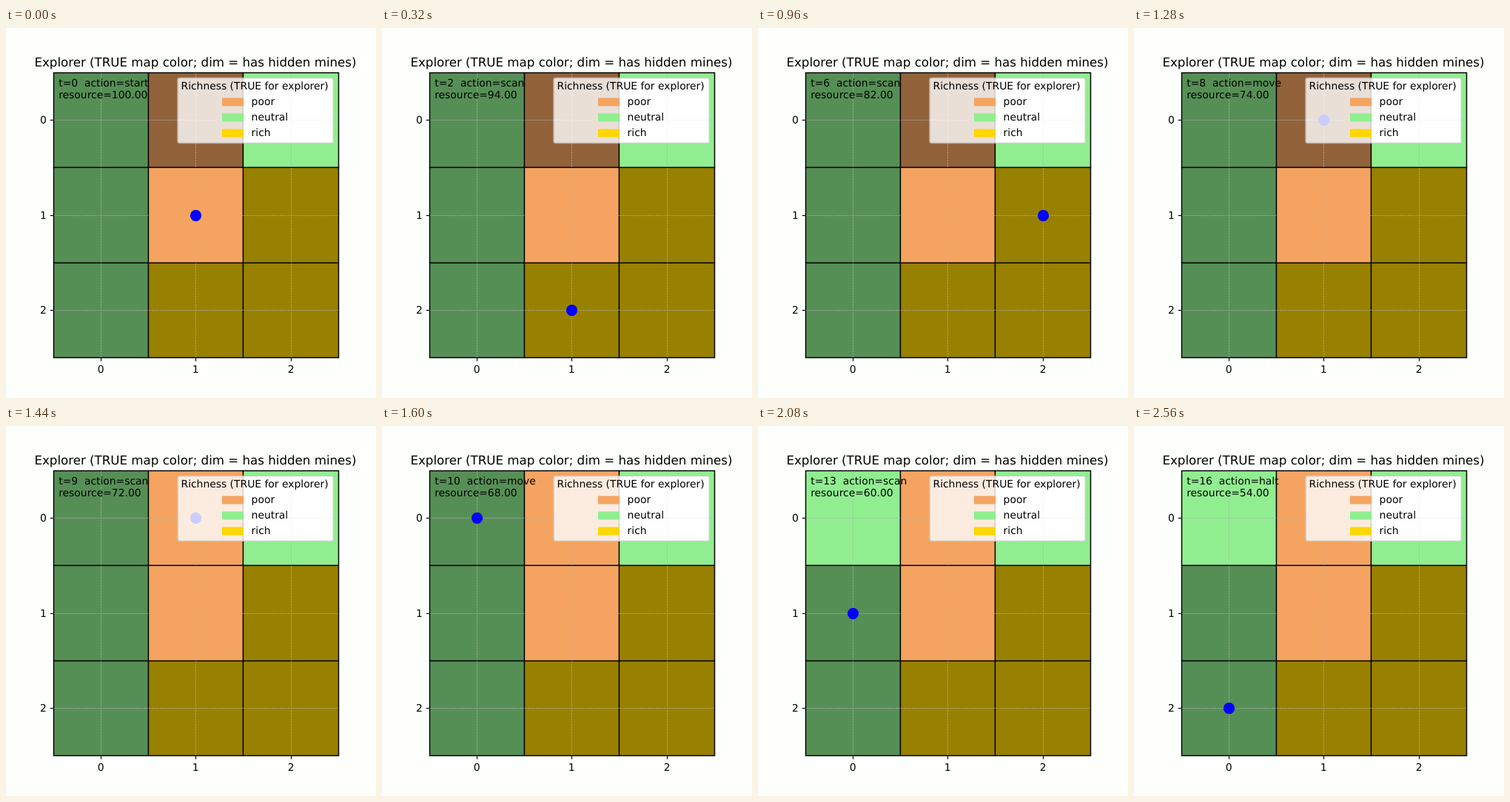
These frames come from a looping animation (500x500 px, 2720 ms). An HTML page:

```html
<!DOCTYPE html>
<html lang="en">
<head>
<meta charset="utf-8">
<title>Explorer map</title>
<style>
  html, body { margin: 0; width: 100%; height: 100%; overflow: hidden; background: #fdfffc; }
  svg { display: block; width: 500px; height: 500px; }
  text { font: 13.89px "DejaVu Sans", sans-serif; text-rendering: geometricPrecision; white-space: pre; }
  .title { font-size: 16.67px; }
  .cell { stroke: #000; stroke-width: 1.39; }
  .grid { stroke: #b0b0b0; stroke-width: .69; stroke-dasharray: 2.57 1.11; }
  .axis { fill: none; stroke: #000; stroke-width: 1.11; }
  .box { fill: #fff; stroke: #ccc; stroke-width: 1.39; opacity: .8; }
</style>
</head>
<body>
<svg viewBox="0 0 500 500">
  <text class="title" x="256" y="52" text-anchor="middle">Explorer (TRUE map color; dim = has hidden mines)</text>
  <g id="cells"></g>
  <rect x="321.2" y="68" width="121" height="87.5" fill="#fdfffc"/>
  <g id="axes"></g>
  <rect class="axis" x="64.5" y="60.5" width="385" height="385"/>
  <circle id="agent" r="7.64" fill="#00f"/>
  <text id="status" x="71.2" y="79"></text>
  <text id="resource" x="71.2" y="95"></text>
  <rect class="box" x="232" y="67.5" width="210.3" height="88" rx="2.8"/>
  <text x="236.5" y="83">Richness (TRUE for explorer)</text>
  <g id="legend"></g>
</svg>
<script>
  const STEP = 160;
  const COST = { start: 0, move: 4, scan: 2, halt: 0 };
  const RICHNESS = { poor: [244, 164, 96], neutral: [144, 238, 144], rich: [255, 215, 0] };
  const MAP = [
    ["neutral", "poor", "neutral"],
    ["neutral", "poor", "rich"],
    ["neutral", "rich", "rich"]
  ];
  const SAFE = ["1,1", "2,0"];
  const CLEARED_AT = { "1,0": 9, "0,0": 11 };

  // Cell borders and tick positions, snapped to the pixel grid
  const edgeX = [64.5, 192.5, 320.5, 449.5], edgeY = [60.5, 188.5, 317.5, 445.5];
  const tickX = [128.5, 256.5, 385.5], tickY = [124.5, 253.5, 381.5];

  // Action, column, row
  const log = [
    ["start", 1, 1], ["move", 1, 2], ["scan", 1, 2], ["move", 2, 2], ["scan", 2, 2],
    ["move", 2, 1], ["scan", 2, 1], ["move", 2, 0], ["move", 1, 0], ["scan", 1, 0],
    ["move", 0, 0], ["scan", 0, 0], ["move", 0, 1], ["scan", 0, 1], ["move", 0, 2],
    ["scan", 0, 2], ["halt", 0, 2]
  ];
  let left = 100;
  const resources = log.map(([action]) => left -= COST[action]);

  const byId = id => document.getElementById(id);
  const rgb = (kind, dim = 1) => `rgb(${RICHNESS[kind].map(v => Math.round(v * dim))})`;

  function add(parent, tag, attrs, label = "") {
    const node = document.createElementNS("http://www.w3.org/2000/svg", tag);
    for (const name in attrs) node.setAttribute(name, attrs[name]);
    node.textContent = label;
    return byId(parent).appendChild(node);
  }

  const cells = [];
  MAP.forEach((line, row) => line.forEach((kind, col) => {
    const key = `${col},${row}`;
    const node = add("cells", "rect", {
      class: "cell", x: edgeX[col], y: edgeY[row],
      width: edgeX[col + 1] - edgeX[col], height: edgeY[row + 1] - edgeY[row]
    });
    cells.push({ node, kind, clearAt: SAFE.includes(key) ? 0 : CLEARED_AT[key] ?? Infinity });
  }));

  tickX.forEach((x, i) => {
    add("axes", "path", { class: "grid", d: `M${x} 445.5V60.5` });
    add("axes", "path", { class: "axis", d: `M${x} 445.5v4.86` });
    add("axes", "text", { x: x - .3, y: 466, "text-anchor": "middle" }, i);
  });
  tickY.forEach((y, i) => {
    add("axes", "path", { class: "grid", d: `M64.5 ${y}H449.5` });
    add("axes", "path", { class: "axis", d: `M64.5 ${y}h-4.86` });
    add("axes", "text", { x: 54.8, y: Math.floor(y) + 5, "text-anchor": "end" }, i);
  });

  Object.keys(RICHNESS).forEach((kind, i) => {
    add("legend", "rect", { x: 292, y: 94.5 + 21 * i, width: 29.2, height: 11, fill: rgb(kind) });
    add("legend", "text", { x: 331.6, y: 104 + 21 * i }, kind);
  });

  let shown = -1;
  function draw() {
    const t = Math.floor(performance.now() / STEP) % log.length;
    if (t !== shown) {
      const [action, col, row] = log[t];
      byId("agent").setAttribute("cx", tickX[col]);
      byId("agent").setAttribute("cy", tickY[row]);
      byId("status").textContent = `t=${t}  action=${action}`;
      byId("resource").textContent = `resource=${resources[t].toFixed(2)}`;
      for (const { node, kind, clearAt } of cells) {
        node.setAttribute("fill", rgb(kind, t >= clearAt ? 1 : .6));
      }
      shown = t;
    }
    requestAnimationFrame(draw);
  }
  draw();
</script>
</body>
</html>
```
